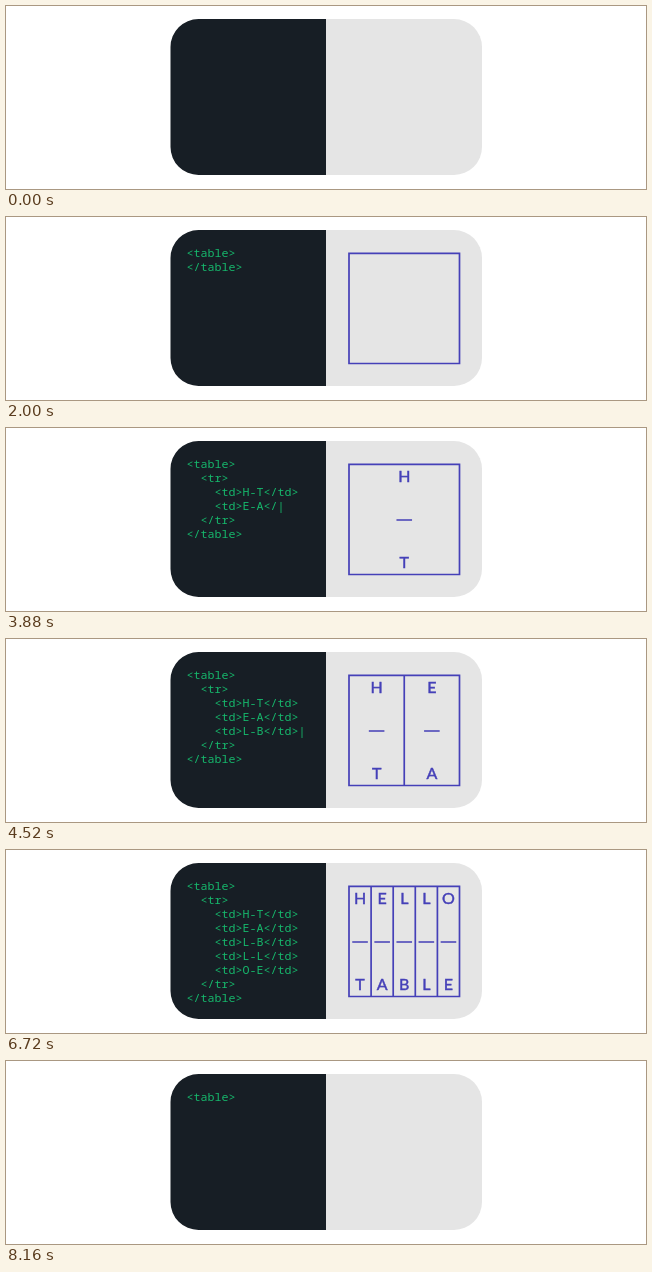
An HTML page that plays this animation: 640 px wide and 183 px high, repeating every 8.2 s.

```html
<!DOCTYPE html>
<html lang="en">
<head>
<meta charset="utf-8">
<title>Hello table</title>
<style>
  html, body { margin: 0; width: 100%; height: 100%; overflow: hidden; background: #fff; }
  svg { display: block; width: 640px; height: 183px; }
  #code { font: 11.67px "Noto Sans Mono", "DejaVu Sans Mono", monospace; fill: #16b86c; white-space: pre; }
  #grid { fill: none; stroke: #4540b8; stroke-width: 1.7; }
  #letters { font: 16px Lato, "Open Sans", sans-serif; fill: #4540b8; stroke: #4540b8; stroke-width: .45; text-anchor: middle; }
</style>
</head>
<body>
<svg viewBox="0 0 640 183">
  <path d="M320 13H192.500a28 28 0 0 0-28 28V141a28 28 0 0 0 28 28H320z" fill="#171e25"/>
  <path d="M320 13H448a28 28 0 0 1 28 28V141a28 28 0 0 1-28 28H320z" fill="#e5e5e5"/>
  <g id="code"></g>
  <path id="grid"/>
  <g id="letters"></g>
</svg>
<script>
const LOOP = 8200, TICK = 40, CELL = 7, PITCH = 14;
const TOP = "HELLO", BOTTOM = "TABLE";
const box = { x: 343, y: 36.3, w: 110.5, h: 110.2 };
const $ = id => document.getElementById(id);

// Each key holds the whole state from its time on; cols -1 means no table.
const keys = [];
let lines = [], caret = -1, cols = -1;
const save = t => keys.push({ t, lines: lines.map(l => ({ ...l })), caret, cols });
const blink = (t, row) => { caret = row; save(t); };
const show = (t, n) => { cols = n; save(t); };

function open(t, row, indent) {
  lines.splice(row, 0, { indent, text: "" });
  blink(t, row);
}
function type(t, row, text) {
  [...text].forEach((c, i) => {
    lines[row].text += c;
    blink(t + i * TICK, row);
  });
}

save(0);
open(440, 0, 0);
type(840, 0, "<table>");
open(1160, 1, 0);
type(1240, 1, "</table>");
show(1600, 0);
blink(2000, -1);

blink(2440, 0);
open(2480, 1, 2);
type(2520, 1, "<tr>");
open(2680, 2, 2);
type(2720, 2, "</tr>");
blink(2920, 1);

// Cells: the preview follows one tick after each closing tag.
[2960, 3520, 4040, 4560, 5080].forEach((t, i) => {
  open(t, i + 2, 4);
  type(t + TICK, i + 2, `<td>${TOP[i]}-${BOTTOM[i]}</td>`);
  show(t + 13 * TICK, i + 1);
});

blink(5880, -1);
blink(6320, 6);
blink(6720, -1);
blink(7160, 6);

caret = -1;
[7560, 7640, 7720, 7800, 7880, 7960, 8040, 8160].forEach((t, i) => {
  lines.pop();
  if (i === 7) cols = -1;
  save(t);
  if (i > 1 && i < 7) show(t + TICK, 6 - i);
});

function addText(parent, x, y, text) {
  const el = document.createElementNS("http://www.w3.org/2000/svg", "text");
  el.setAttribute("x", x);
  el.setAttribute("y", y);
  el.textContent = text;
  parent.append(el);
}

function draw({ lines, caret, cols }) {
  const code = $("code"), letters = $("letters");
  code.replaceChildren();
  letters.replaceChildren();
  lines.forEach((l, i) =>
    addText(code, 180.5 + l.indent * CELL, 39.7 + i * PITCH, l.text + (i === caret ? "|" : "")));

  let d = cols < 0 ? "" : `M${box.x} ${box.y}h${box.w}v${box.h}h${-box.w}z`;
  const w = box.w / cols;
  for (let i = 0; i < cols; i++) {
    const left = box.x + i * w, mid = left + w / 2;
    if (i) d += `M${left} ${box.y}v${box.h}`;
    d += `M${mid - 7.8} 92h15.6`;
    addText(letters, mid, 54.1, TOP[i]);
    addText(letters, mid, 139.9, BOTTOM[i]);
  }
  $("grid").setAttribute("d", d);
}

let last = null;
const start = performance.now();
function frame() {
  const t = (performance.now() - start) % LOOP;
  const key = keys.findLast(k => k.t <= t) || keys[0];
  if (key !== last) draw(last = key);
  requestAnimationFrame(frame);
}
frame();
</script>
</body>
</html>
```
